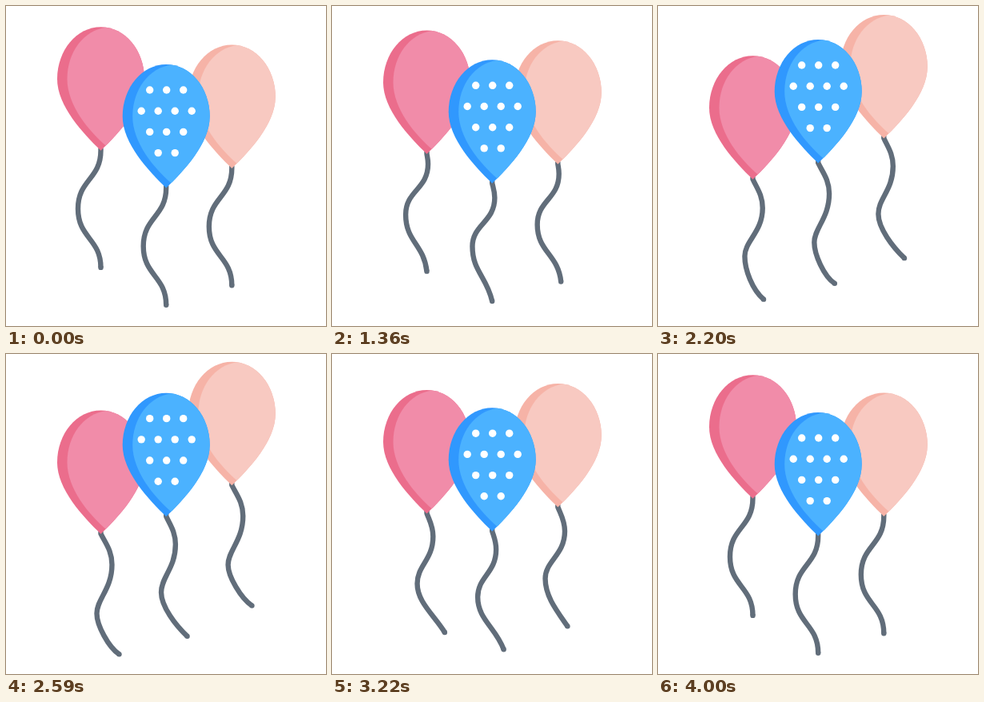
These frames come from a looping animation (400x400 px, 4030 ms). An HTML page with a canvas:

```html
<!DOCTYPE html>
<html lang="en">
<head>
<meta charset="utf-8">
<title>Balloons</title>
<style>
html, body { margin: 0; width: 100%; height: 100%; overflow: hidden; background: #fff; }
canvas { display: block; width: 400px; height: 400px; }
</style>
</head>
<body>
<canvas id="c"></canvas>
<script>
const canvas = document.getElementById('c');
const ctx = canvas.getContext('2d');
const ratio = window.devicePixelRatio || 1;
canvas.width = canvas.height = 400 * ratio;

const LOOP = 4030, START = 1030, END = 4000, STEP = 30;
const GRAY = '#616d7a';

// lift: furthest drift and when it is reached
// bend: when the upper bend of the string swings furthest; lag: delay of each lower part
const balloons = [
  { x: 118.5, top: 26.2, dark: '#eb6d8c', light: '#f18ca9', lift: 44.5, peak: 2670, bend: 2550, lag: 200 },
  { x: 282.3, top: 48.5, dark: '#f6b3a7', light: '#f8c9c1', lift: -40.5, peak: 2450, bend: 2650, lag: -150 },
  { x: 200.2, top: 73, dark: '#3098fe', light: '#4bb2ff', lift: -31, peak: 2200, bend: 2075, lag: 225, dots: true }
];

const clamp = u => Math.min(1, Math.max(0, u));
const ease = u => (1 - Math.cos(Math.PI * clamp(u))) / 2;

// rises from 0 to 1 at the peak and falls back; power > 1 makes the fall start faster
function pulse(t, start, peak, power) {
  if (t < peak) return ease((t - start) / (peak - start));
  return ease(Math.pow(clamp((END - t) / (END - peak)), power));
}

// sideways swing of part i of the string; a trailing free end sets off late
function swing(b, i, t) {
  const start = START + Math.max(0, b.lag) * i * (i - 1);
  return pulse(t, start, b.bend + b.lag * i, 1);
}

function drawString(b, t) {
  const rx = 14 * swing(b, 0, t), ry = 10.3 * Math.sqrt(rx);
  const lx = 24 * swing(b, 1, t) - 28.5, ly = 73 + 1.9 * rx;
  const ex = 26.5 * swing(b, 2, t), ey = 146.5 + 0.3 * rx;
  const mid = (ry + ly) / 2;
  const soft = 0.5 - 0.015 * rx;
  const angle = 0.07 * rx, reach = 36 - 1.4 * rx;
  ctx.beginPath();
  ctx.moveTo(0, -3);
  ctx.lineTo(0, 0);
  ctx.bezierCurveTo(rx * 0.4, ry * 0.3, rx, ry * 0.55, rx, ry);
  ctx.bezierCurveTo(rx, mid, lx, ly - soft * (ly - ry), lx, ly);
  ctx.bezierCurveTo(lx, ly + soft * (ey - ly),
    ex - reach * Math.sin(angle), ey - reach * Math.cos(angle), ex, ey);
  ctx.strokeStyle = GRAY;
  ctx.lineWidth = 6.4;
  ctx.lineJoin = 'round';
  ctx.stroke();
  dot(ex, ey, 3.2, GRAY);
}

function dot(x, y, r, color) {
  ctx.beginPath();
  ctx.arc(x, y, r, 0, 7);
  ctx.fillStyle = color;
  ctx.fill();
}

function drawBody(b) {
  ctx.beginPath();
  ctx.moveTo(0, 0);
  ctx.bezierCurveTo(30, 0, 54.5, 29, 54.5, 65);
  ctx.bezierCurveTo(54.5, 99, 22, 133, 0, 154.5);
  ctx.bezierCurveTo(-22, 133, -54.5, 99, -54.5, 65);
  ctx.bezierCurveTo(-54.5, 29, -30, 0, 0, 0);
  ctx.fillStyle = b.dark;
  ctx.fill();
  ctx.save();
  ctx.clip();
  ctx.beginPath();
  ctx.moveTo(6.5, 0.5);
  ctx.bezierCurveTo(-21, 4, -42, 31, -42, 65);
  ctx.bezierCurveTo(-42, 98, -15, 130, 6.5, 148.5);
  ctx.lineTo(60, 148.5);
  ctx.lineTo(60, 0);
  ctx.fillStyle = b.light;
  ctx.fill();
  ctx.restore();
}

function drawDots() {
  [3, 4, 3, 2].forEach((n, row) => {
    for (let i = 0; i < n; i++) {
      dot(0.5 + (i - (n - 1) / 2) * 21, 32 + row * 26.2, 4.7, '#fff');
    }
  });
}

function draw(now) {
  let t = now % LOOP;
  t = START + Math.max(0, Math.floor((t - START) / STEP)) * STEP;
  ctx.setTransform(ratio, 0, 0, ratio, 0, 0);
  ctx.fillStyle = '#fff';
  ctx.fillRect(0, 0, 400, 400);
  for (const b of balloons) {
    ctx.save();
    ctx.translate(b.x, b.top + b.lift * pulse(t, START, b.peak, 1.5));
    ctx.save();
    ctx.translate(0, 154.2);
    drawString(b, t);
    ctx.restore();
    drawBody(b);
    if (b.dots) drawDots();
    ctx.restore();
  }
}

const begin = performance.now();
function tick() {
  draw(performance.now() - begin);
  requestAnimationFrame(tick);
}
tick();
</script>
</body>
</html>
```
